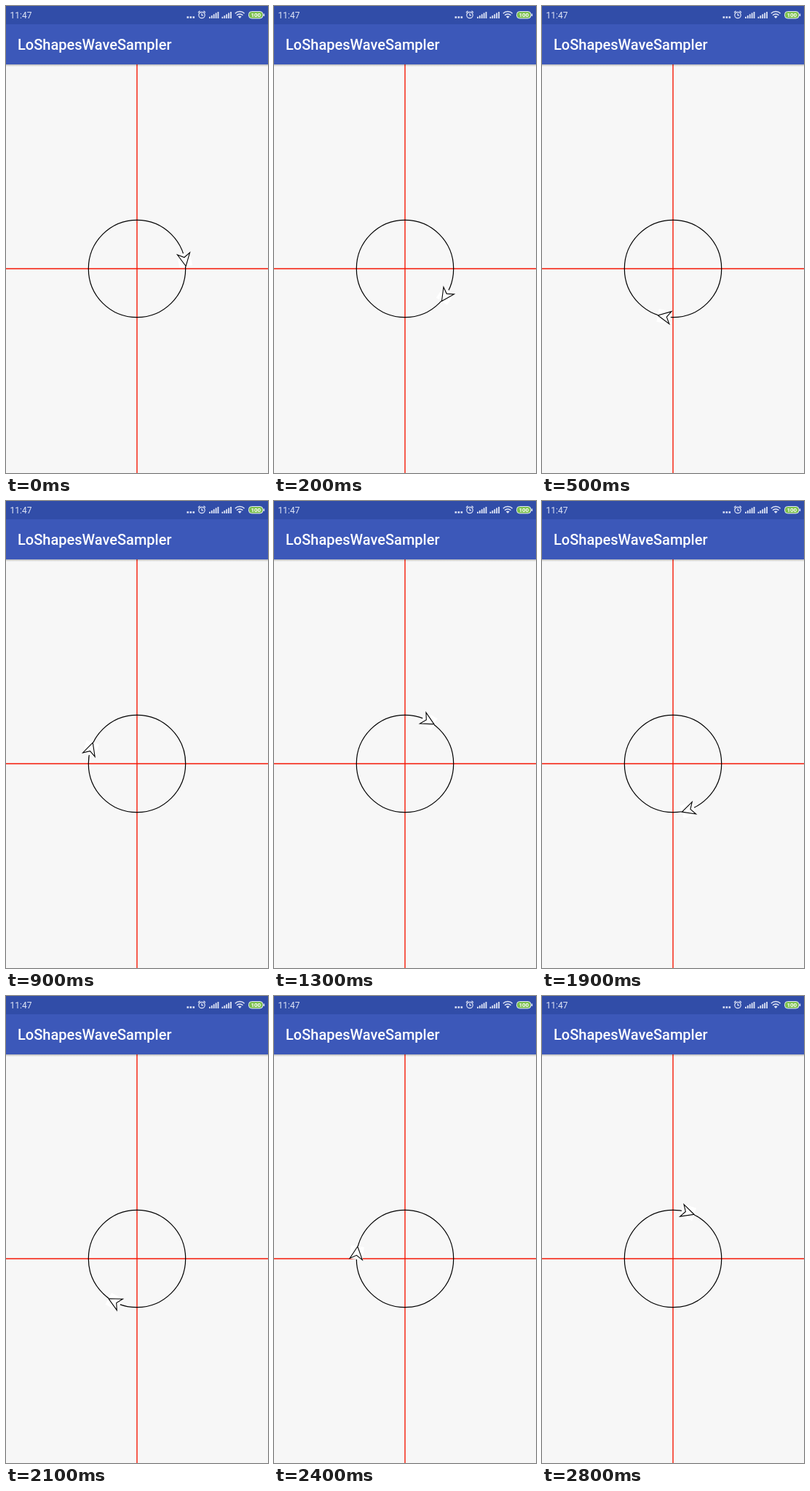
Write an HTML page that moves like this. It is 360 px wide and 640 px high and loops after 2.9 s.

```html
<!DOCTYPE html>
<html lang="en">
<head>
<meta charset="utf-8">
<title>Arrow on a circle</title>
<style>
  html, body { margin: 0; width: 100%; height: 100%; overflow: hidden; background: #f7f7f7; }
  svg { display: block; width: 360px; height: 640px; font-family: Roboto, sans-serif; }
</style>
</head>
<body>
<svg viewBox="0 0 360 640">
  <defs>
    <linearGradient id="shade" x2="0" y2="1">
      <stop stop-opacity=".26"/>
      <stop offset="1" stop-opacity="0"/>
    </linearGradient>
    <path id="signal" d="M.9 17v-2.2M3.8 17v-4M6.7 17v-5.7M9.6 17v-7.4M12.5 17v-9" stroke="#dfe5f6" stroke-width="1.8"/>
  </defs>

  <rect width="360" height="640" fill="#f7f7f7"/>
  <path d="M180 80V640M0 360H360" stroke="#f51a08" stroke-width="1.4"/>
  <circle cx="180" cy="360" r="66.7" fill="none" stroke="#000" stroke-width="1.2"/>
  <g id="arrow">
    <rect x="-9" y="-9" width="18" height="18" fill="#fff"/>
    <path d="M8.7 0L-8.7 -8.7L-3.5 0L-8.7 8.7Z" fill="#fff" stroke="#000" stroke-width="1.1"/>
  </g>

  <rect y="80" width="360" height="3" fill="url(#shade)"/>
  <rect width="360" height="80" fill="#3c58b9"/>
  <rect width="360" height="25" fill="#314da8"/>
  <text x="16" y="60" font-size="20" font-weight="500" fill="#fff">LoShapesWaveSampler</text>

  <text x="5.5" y="17" font-size="12" fill="#dfe5f6">11:47</text>
  <path d="M248.5 15.5h2.6M252.5 15.5h2.6M256.5 15.5h2.6" stroke="#dfe5f6" stroke-width="2.4"/>
  <g fill="none" stroke="#dfe5f6" stroke-width="1.2">
    <circle cx="269" cy="12.5" r="4.2"/>
    <path d="M269 10v2.8h2M264 9l2.5-2.3M274 9l-2.5-2.3"/>
  </g>
  <use href="#signal" x="279"/>
  <use href="#signal" x="296.5"/>
  <g fill="none" stroke="#dfe5f6" stroke-width="1.5">
    <path d="M314.8 10.2a9 9 0 0 1 12.8 0M317 12.7a6 6 0 0 1 8.4 0"/>
    <path d="M318.8 14.6a3.4 3.4 0 0 1 4.8 0L321.2 17Z" fill="#dfe5f6" stroke="none"/>
  </g>
  <rect x="333.5" y="7.5" width="19.5" height="9.5" rx="4" fill="#7cc04e" stroke="#dfe5f6"/>
  <path d="M354.4 10.5v3.5" stroke="#dfe5f6" stroke-width="1.6"/>
  <text x="343.3" y="15.3" font-size="8" font-weight="700" fill="#fff" text-anchor="middle">100</text>
</svg>
<script>
  const LOOP = 2900, STEP = 100;
  // [time in ms, angle in degrees]: slightly uneven pace around the circle
  const pace = [[0, -10.4], [500, 100.5], [600, 125], [900, 198], [1200, 273], [1300, 299],
                [1800, 408], [1900, 432], [2400, 547], [2800, 648]];
  const arrow = document.getElementById('arrow');

  function angleAt(time) {
    const i = Math.max(1, pace.findIndex(([t]) => t >= time));
    const [t0, a0] = pace[i - 1], [t1, a1] = pace[i];
    return a0 + (a1 - a0) * (time - t0) / (t1 - t0);
  }

  function draw() {
    const time = Math.floor(performance.now() % LOOP / STEP) * STEP;
    arrow.setAttribute('transform', `translate(180 360) rotate(${angleAt(time)}) translate(66.7 0) rotate(90)`);
    requestAnimationFrame(draw);
  }
  draw();
</script>
</body>
</html>
```
